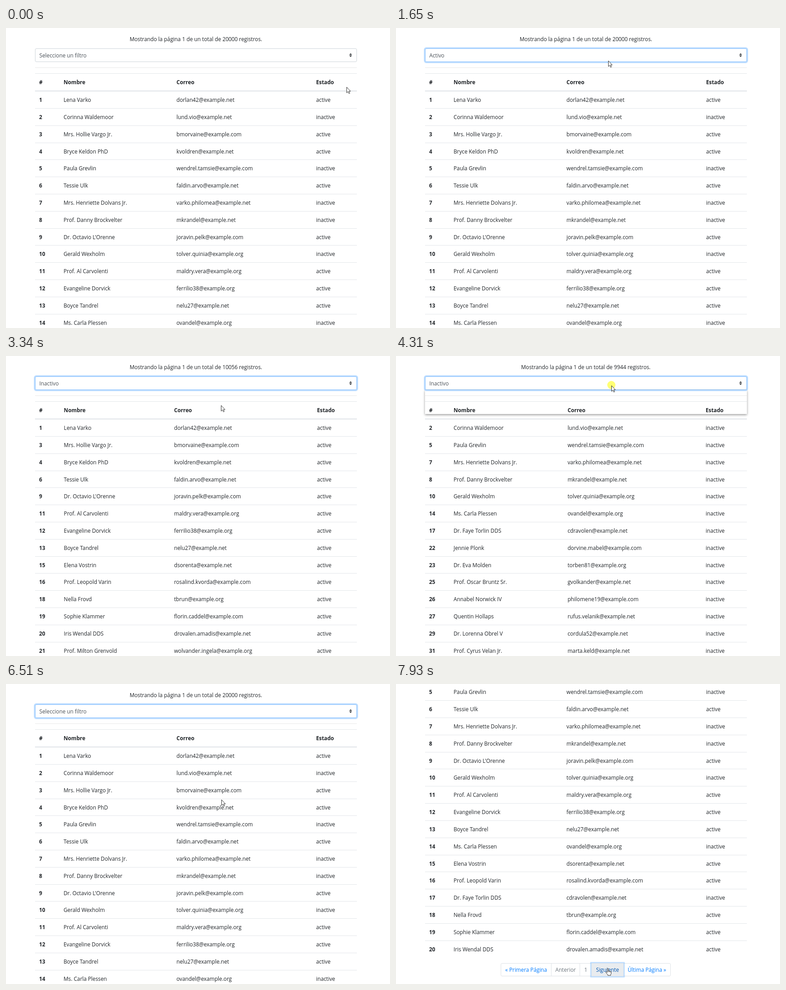
An HTML page that plays this animation: 847 by 662 pixels, repeating every 8000 ms.

```html
<!DOCTYPE html>
<html lang="es">
<head>
<meta charset="utf-8">
<title>Registros</title>
<style>
html, body { margin: 0; width: 100%; height: 100%; overflow: hidden; background: #fff; }
body { position: relative; font: 11.77px "Open Sans", "Noto Sans", sans-serif; color: #212529; white-space: nowrap; }
body * { position: absolute; box-sizing: border-box; }
#page, #page > .view { left: 0; top: 0; width: 847px; height: 960px; }

/* every animation shares the same 8 s clock */
#page, .view, .label, #select, #popup, #face, .option, #next, #cursor, #click, #arrow, #hand {
  animation: 8s linear infinite;
}
.view, .label, #popup, .option, #click, #arrow, #hand { animation-timing-function: step-end; }

.caption { left: 64px; width: 709.5px; top: 14px; line-height: 20px; text-align: center; }
.row { left: 64px; width: 710px; height: 38px; line-height: 38px; border-top: 1px solid #e3e6ea; }
.head { top: 100px; font-weight: 700; }
.head::after { content: ""; position: absolute; left: 0; right: 0; top: 37px; height: 2px; background: #e0e4e8; }
.row.first { border-top-color: transparent; }
.row span { top: -1px; }
.row span:nth-child(1) { left: 9px; font-weight: 700; }
.row span:nth-child(2) { left: var(--name); }
.row span:nth-child(3) { left: var(--mail); }
.row span:nth-child(4) { left: var(--state); }
#all { --name: 63px; --mail: 312px; --state: 620px; animation-name: all; }
#active { --name: 63.6px; --mail: 306.7px; --state: 622px; animation-name: active; }
#inactive { --name: 63px; --mail: 314.4px; --state: 619px; animation-name: inactive; }
#rule { left: 64px; top: 87px; width: 710px; height: 1px; background: #e9e9e9; }

#select { left: 64px; top: 45px; width: 710px; height: 30px; border: 1px solid #ced4da; border-radius: 3px; background: #fff; color: #495057; animation-name: focus; }
.label { left: 8.5px; top: 0; line-height: 28px; }
#select svg { left: 692.4px; top: 10.2px; width: 6.2px; height: 7.7px; }
#l0 { animation-name: l0; }
#l1 { animation-name: l1; }
#l2 { animation-name: l2; }

#popup { left: 64px; top: 75px; width: 710px; height: 53px; box-shadow: 0 2px 5px rgba(0,0,0,.4); animation-name: popup; }
#face { inset: 0; border: 1px solid #8a8d90; background: #fff; animation-name: face; }
.option { left: 0; width: 708px; height: 17px; padding-left: 9px; line-height: 16px; color: #495057; }
#o0 { top: 0; animation-name: o0; }
#o1 { top: 17px; animation-name: o1; }
#o2 { top: 34px; animation-name: o2; }

#pager { left: 231px; top: 908px; width: 375px; height: 29px; }
#pager div { top: 0; height: 29px; border: 1px solid #dee2e6; background: #fff; color: #007bff; line-height: 26px; text-align: center; }
#pager div:first-child { border-radius: 3px 0 0 3px; }
#pager div:last-child { border-radius: 0 3px 3px 0; }
#pager .off { color: #6c757d; }
#pager #next { z-index: 1; animation-name: next; }

#cursor { left: 0; top: 0; animation-name: move; animation-timing-function: ease-in-out; }
#click { left: -9.5px; top: -10px; width: 18px; height: 18px; border-radius: 50%; background: rgba(255,255,0,.55); animation-name: click; }
#cursor svg { overflow: visible; width: 14px; height: 18px; fill: #fff; stroke: #1c1c1c; stroke-width: .9; stroke-linejoin: round; }
#arrow { left: 0; top: 0; animation-name: arrow; }
#hand { left: -5px; top: -1px; animation-name: hand; }

@keyframes page {
  0%, 82% { transform: translateY(0); }
  83.3% { transform: translateY(-82px); }
  85% { transform: translateY(-214px); }
  86.2% { transform: translateY(-272px); }
  87.4%, 100% { transform: translateY(-292px); }
}
#page { animation-name: page; }
@keyframes all { 0%, 73.4%, 100% { opacity: 1; } 22.7% { opacity: 0; } }
@keyframes active { 0%, 47.2%, 100% { opacity: 0; } 22.7% { opacity: 1; } }
@keyframes inactive { 0%, 73.4%, 100% { opacity: 0; } 47.2% { opacity: 1; } }
@keyframes l0 { 0%, 69.7%, 100% { opacity: 1; } 16.6% { opacity: 0; } }
@keyframes l1 { 0%, 40.6%, 100% { opacity: 0; } 16.6% { opacity: 1; } }
@keyframes l2 { 0%, 69.7%, 100% { opacity: 0; } 40.6% { opacity: 1; } }
@keyframes focus {
  0%, 6.2% { border-color: #ced4da; box-shadow: 0 0 0 2.5px rgba(0,123,255,0); }
  8.1%, 100% { border-color: #80bdff; box-shadow: 0 0 0 2.5px rgba(0,123,255,.25); }
}
@keyframes popup {
  0%, 16.6%, 40.6%, 69.7%, 100% { opacity: 0; }
  6.2%, 28.4%, 53.8% { opacity: 1; }
}
@keyframes face {
  0%, 7.3%, 17%, 29.6%, 41%, 55.1%, 70%, 100% { opacity: 0; }
  9%, 16.7%, 31.5%, 40.7%, 57%, 69.8% { opacity: 1; }
}
@keyframes o0 {
  0%, 32.3%, 58%, 100% { background: #1e90ff; color: #fff; }
  9.2%, 34.5% { background: #fff; color: #495057; }
}
@keyframes o1 {
  0%, 32.3%, 35.5%, 100% { background: #fff; color: #495057; }
  9.2%, 34.5% { background: #1e90ff; color: #fff; }
}
@keyframes o2 {
  0%, 58%, 100% { background: #fff; color: #495057; }
  35.5% { background: #1e90ff; color: #fff; }
}
@keyframes next {
  0%, 93.2% { background: #fff; color: #007bff; box-shadow: 0 0 0 2.5px rgba(0,123,255,0); }
  93.3%, 95% { background: #e9ecef; color: #0056b3; box-shadow: 0 0 0 2.5px rgba(0,123,255,0); }
  97%, 100% { background: #e9ecef; color: #0056b3; box-shadow: 0 0 0 2.5px rgba(0,123,255,.25); }
}
@keyframes click {
  0%, 8.5%, 16.6%, 31%, 40.6%, 56%, 69.7%, 98%, 100% { opacity: 0; }
  6.2%, 15%, 28.4%, 38.4%, 53.8%, 66.8%, 95% { opacity: 1; }
}
@keyframes arrow { 0% { opacity: 1; } 93.2%, 100% { opacity: 0; } }
@keyframes hand { 0% { opacity: 0; } 93.2%, 100% { opacity: 1; } }
@keyframes move {
  0%, .6% { transform: translate(751px, 130px); }
  4.3%, 7% { transform: translate(492px, 63px); }
  9.9%, 18.4% { transform: translate(467px, 93px); }
  20.5%, 28.3% { transform: translate(468px, 72px); }
  28.4%, 31% { transform: translate(473px, 69px); }
  32.9%, 34.4% { transform: translate(473px, 88px); }
  36.3%, 40.6% { transform: translate(474px, 116px); }
  45%, 54.9% { transform: translate(475px, 65px); }
  59.8%, 73.3% { transform: translate(482px, 79px); }
  81%, 85.3% { transform: translate(475px, 255px); }
  88.1%, 88.8% { transform: translate(445px, 488px); }
  94%, 100% { transform: translate(467px, 628px); }
}
</style>
</head>
<body>
<div id="page">
  <div id="all" class="view"></div>
  <div id="active" class="view"></div>
  <div id="inactive" class="view"></div>
  <div id="rule"></div>
  <div id="select">
    <span class="label" id="l0">Seleccione un filtro</span>
    <span class="label" id="l1">Activo</span>
    <span class="label" id="l2">Inactivo</span>
    <svg viewBox="0 0 4 5"><path fill="#212529" d="M2 0L0 2h4zm0 5L0 3h4z"/></svg>
  </div>
  <div id="popup">
    <div id="face">
      <div class="option" id="o0">Seleccione un filtro</div>
      <div class="option" id="o1">Activo</div>
      <div class="option" id="o2">Inactivo</div>
    </div>
  </div>
  <div id="pager">
    <div style="left:0;width:112px">« Primera Página</div>
    <div class="off" style="left:111px;width:64px">Anterior</div>
    <div class="off" style="left:174px;width:27px">1</div>
    <div id="next" style="left:200px;width:71px">Siguiente</div>
    <div style="left:270px;width:105px">Última Página »</div>
  </div>
</div>
<div id="cursor">
  <div id="click"></div>
  <svg id="arrow"><path d="M.5 .5V13L3.4 10.3 5.4 14.7 7.3 13.9 5.4 9.6H9Z"/></svg>
  <svg id="hand"><path d="M4 9.6V1.8a1.3 1.3 0 0 1 2.6 0V6.2q1.9-.6 2.2.6 1.8-.4 2.1.7 1.7-.2 1.7 1.2V11q0 2-1.2 3.3V16H5.2V14.6L1.2 10q-.9-1.5.3-2 1.2-.3 2.5 1.6ZM6.6 6.2V8.6M8.8 6.8V8.8M10.9 7.5V9"/></svg>
</div>
<script>
// id | name | mailbox | domain ending | active flag
const people = `1|Lena Varko|dorlan42|net|1
2|Corinna Waldemoor|lund.vio|net|0
3|Mrs. Hollie Vargo Jr.|bmorvaine|com|1
4|Bryce Keldon PhD|kvoldren|net|1
5|Paula Grevlin|wendrel.tamsie|com|0
6|Tessie Ulk|faldin.arvo|net|1
7|Mrs. Henriette Dolvans Jr.|varko.philomea|net|0
8|Prof. Danny Brockvelter|mkrandel|net|0
9|Dr. Octavio L'Orenne|joravin.pelk|com|1
10|Gerald Wexholm|tolver.quinia|org|0
11|Prof. Al Carvolenti|maldry.vera|org|1
12|Evangeline Dorvick|ferrilio38|org|1
13|Boyce Tandrel|nelu27|net|1
14|Ms. Carla Plessen|ovandel|org|0
15|Elena Vostrin|dsorenta|net|1
16|Prof. Leopold Varin|rosalind.kvorda|com|1
17|Dr. Faye Torlin DDS|cdravolen|net|0
18|Nella Frovd|tbrun|org|1
19|Sophie Klammer|florin.caddel|com|1
20|Iris Wendal DDS|drovalen.amadis|net|1
21|Prof. Milton Grenvold|wolvander.ingela|org|1
22|Jennie Plonk|dorvine.mabel|com|0
23|Dr. Eva Molden|torben81|org|0
25|Prof. Oscar Bruntz Sr.|gvolkander|net|0
26|Annabel Norwick IV|philomene19|com|0
27|Quentin Hollaps|rufus.velanik|net|0
29|Dr. Lorenna Obrel V|cordula52|net|0
31|Prof. Cyrus Velan Jr.|marta.keld|net|0`.split('\n').map(line => {
  const [id, name, box, end, on] = line.split('|');
  return [id, name, `${box}@example.${end}`, on === '1' ? 'active' : 'inactive'];
});

const cells = list => list.map(text => `<span>${text}</span>`).join('');

function fill(id, total, list) {
  const rows = list.map((person, i) =>
    `<div class="row${i ? '' : ' first'}" style="top:${(139.2 + 37.81 * i).toFixed(2)}px">${cells(person)}</div>`);
  document.getElementById(id).innerHTML =
    `<div class="caption">Mostrando la página 1 de un total de ${total} registros.</div>` +
    rows.join('') +
    `<div class="row head">${cells(['#', 'Nombre', 'Correo', 'Estado'])}</div>`;
}

fill('all', 20000, people.slice(0, 20));
fill('active', 10056, people.filter(p => p[3] === 'active'));
fill('inactive', 9944, people.filter(p => p[3] === 'inactive'));
</script>
</body>
</html>
```
